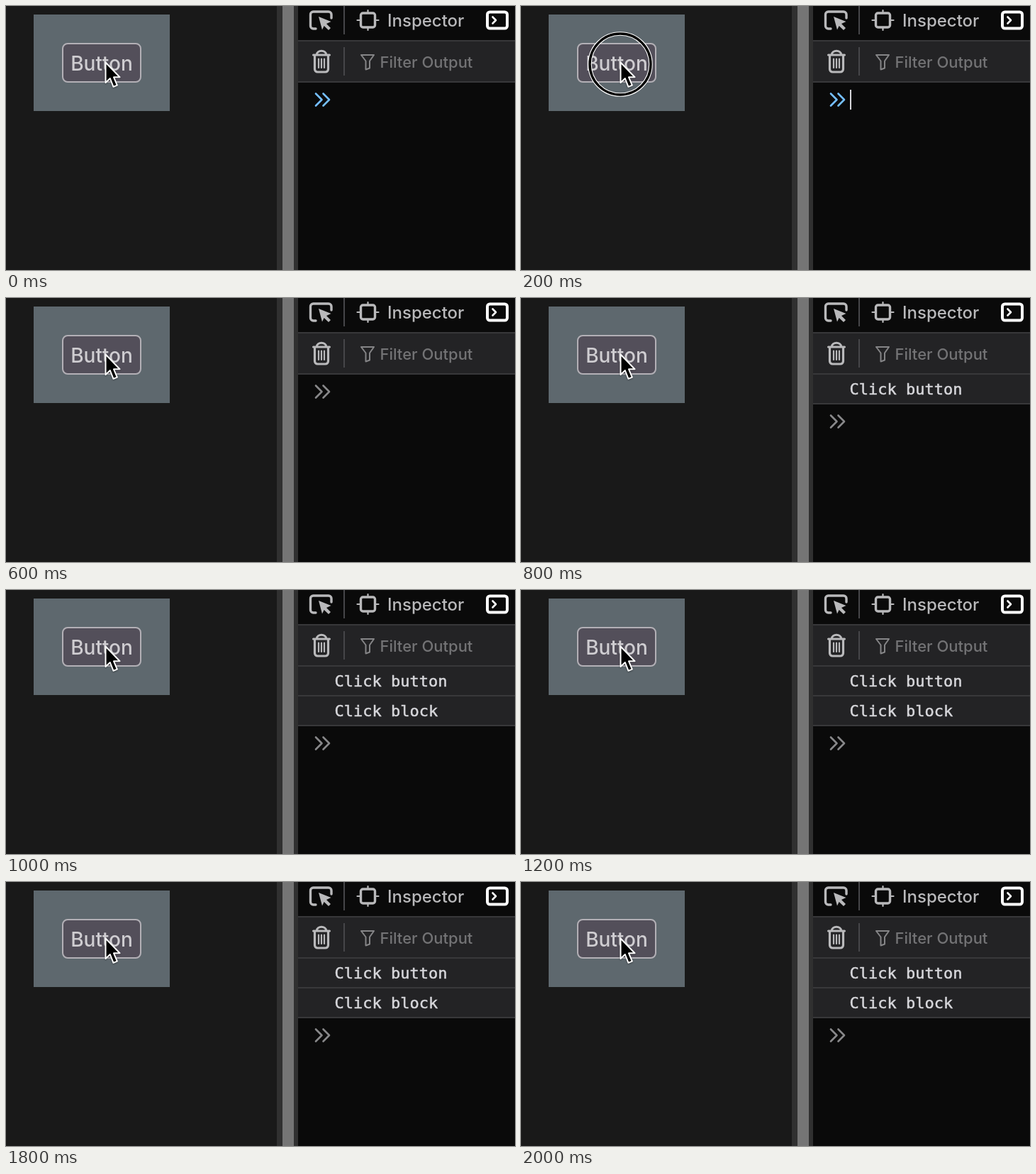
These frames come from a looping animation (718 by 372 pixels, 2400 ms). An HTML page:

```html
<!DOCTYPE html>
<html lang="en">
<head>
<meta charset="utf-8">
<title>Click bubbling</title>
<style>
  html, body { margin: 0; width: 100%; height: 100%; overflow: hidden; background: #191919; }
  svg { display: block; width: 718px; height: 372px; }
  text { font-family: Inter, sans-serif; font-weight: 500; }
  .log text { font: 22px "DejaVu Sans Mono", monospace; fill: #d7d7db; stroke: #d7d7db; stroke-width: .5; }
  .line { fill: none; stroke-linecap: round; stroke-linejoin: round; }
</style>
</head>
<body>
<svg viewBox="0 0 718 372">
  <!-- Page -->
  <rect width="718" height="372" fill="#191919"/>
  <rect x="39" y="12" width="192" height="136" fill="#5e686e"/>
  <rect id="button" x="80" y="53" width="110" height="54" rx="7" stroke-width="2"/>
  <text id="label" x="135" y="91" font-size="28" text-anchor="middle">Button</text>
  <g id="ring" fill="none">
    <circle cx="140" cy="82" r="43" stroke="#fff" stroke-width="5.6"/>
    <circle cx="140" cy="82" r="43" stroke="#000" stroke-width="3.4"/>
  </g>
  <path d="M140.5 79.5V108L146.8 102L151.5 113.8L156.8 111.6L152 100.3H160.5Z"
        fill="#000" stroke="#fff" stroke-width="2" stroke-linejoin="round"
        style="filter: drop-shadow(0 1px 1px rgba(0,0,0,.35))"/>

  <!-- Splitter -->
  <rect x="382" width="30" height="372" fill="#303030"/>
  <rect x="390" width="16" height="372" fill="#757575"/>

  <!-- Developer tools -->
  <rect x="412" width="306" height="372" fill="#0a0a0a"/>
  <rect x="412" y="48" width="306" height="60" fill="#38383a"/>
  <rect x="412" y="50" width="306" height="56" fill="#232325"/>
  <path d="M477 0V40M477 58V98" stroke="#464649" stroke-width="2"/>

  <g class="line" stroke="#b9b9bb" stroke-width="3.4">
    <path d="M437 32H433.5A4 4 0 0 1 429.5 28V12A4 4 0 0 1 433.5 8H455A4 4 0 0 1 459 12V17"/>
    <rect x="500.5" y="10" width="20" height="20" rx="3"/>
    <path d="M510.5 6V9M510.5 31V34M495.5 20H499M522 20H525.5" stroke-width="2.2"/>
    <path d="M433.5 69H456.5M438.5 68A6.5 4.8 0 0 1 451.5 68" stroke-width="3"/>
    <path d="M435.5 70V89A4 4 0 0 0 439.5 93H450.5A4 4 0 0 0 454.5 89V70" stroke-width="3.2"/>
    <path d="M441 74.5V87M445 74.5V87M449 74.5V87" stroke-width="2.2"/>
  </g>
  <path d="M441 15L458.5 22L452 25L458 31L455 34L448.7 28L446 33.5Z" fill="#b9b9bb"/>
  <path class="line" d="M501 69H519L513 77.5V87.5L507.5 89.5V77.5Z" stroke="#858587" stroke-width="2"/>
  <g class="line" stroke="#fff">
    <rect x="679" y="8.5" width="28" height="23" rx="3.5" stroke-width="4"/>
    <path d="M686.5 15.5L691 20L686.5 24.5" stroke-width="2.6"/>
  </g>
  <text x="538" y="28.5" font-size="24" fill="#b9b9bb">Inspector</text>
  <text x="527.5" y="87" font-size="22" fill="#737375">Filter Output</text>

  <g class="log">
    <rect x="412" y="108" width="306" height="40" fill="#232325"/>
    <rect x="412" y="148" width="306" height="2" fill="#38383a"/>
    <text x="463.5" y="136">Click button</text>
  </g>
  <g class="log">
    <rect x="412" y="150" width="306" height="40" fill="#232325"/>
    <rect x="412" y="190" width="306" height="2" fill="#38383a"/>
    <text x="463.5" y="178">Click block</text>
  </g>
  <g id="prompt">
    <path id="chevrons" class="line" d="M437 123.500L445.500 132L437 140.500M447.500 123.500L456 132L447.500 140.500" stroke-width="2.600"/>
    <rect id="caret" x="464" y="118" width="2" height="28" fill="#d7d7db"/>
  </g>
</svg>
<script>
const LOOP = 2400;
const ROW_HEIGHT = 42;
const steps = [
  { at: 0, focus: true },
  { at: 200, focus: true, caret: true, ring: true },
  { at: 400, ring: true, pressed: true },
  { at: 600 },
  { at: 800, rows: 1 },
  { at: 1000, rows: 2 },
];

const byId = id => document.getElementById(id);
const [button, label, ring, prompt, chevrons, caret] =
  ['button', 'label', 'ring', 'prompt', 'chevrons', 'caret'].map(byId);
const logs = document.querySelectorAll('.log');

const set = (node, attrs) => {
  for (const name in attrs) node.setAttribute(name, attrs[name]);
};
const show = (node, on) => set(node, { visibility: on ? 'visible' : 'hidden' });

function draw({ focus, caret: caretOn, ring: ringOn, pressed, rows = 0 }) {
  set(button, pressed
    ? { fill: '#5d5963', stroke: '#cfcdd1' }
    : { fill: '#534f5a', stroke: '#b3b0b6' });
  set(label, { fill: pressed ? '#d6d4d8' : '#cfcdd1' });
  set(chevrons, { stroke: focus ? '#75bfff' : '#88888a' });
  set(prompt, { transform: `translate(0 ${rows * ROW_HEIGHT})` });
  show(ring, ringOn);
  show(caret, caretOn);
  logs.forEach((log, i) => show(log, i < rows));
}

const start = performance.now();
let current;
function tick(now) {
  const time = Math.max(0, now - start) % LOOP;
  const step = steps.findLast(s => s.at <= time);
  if (step !== current) draw(current = step);
  requestAnimationFrame(tick);
}
tick(start);
</script>
</body>
</html>
```
